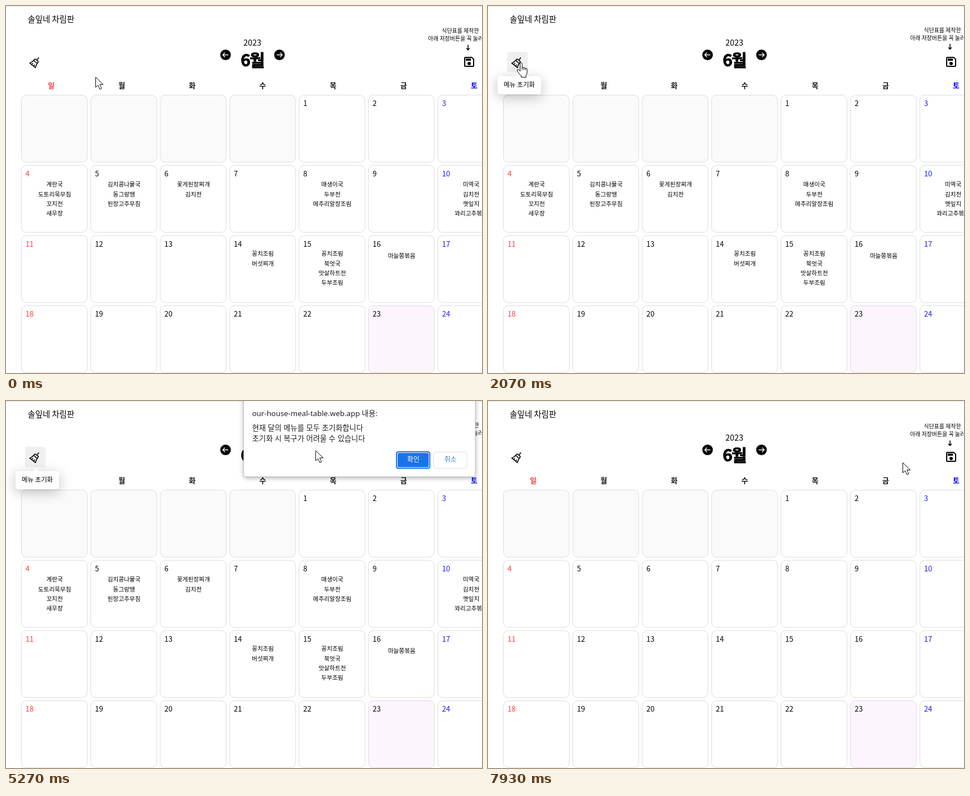
Recreate the animation shown at these times as an HTML page with a canvas. Size 852 by 657 pixels, loop 8000 ms.

```html
<!DOCTYPE html>
<html lang="ko">
<head>
<meta charset="utf-8">
<title>식단 달력</title>
<style>
html, body { margin: 0; width: 100%; height: 100%; overflow: hidden; background: #fff; }
canvas { display: block; }
</style>
</head>
<body>
<canvas id="stage" width="852" height="657"></canvas>
<script>
const ctx = document.getElementById('stage').getContext('2d');
const LOOP = 8000;
const HOVER_AT = 1070, DIALOG_AT = 2100, CLOSE_AT = 6670;
const KR = '"Noto Sans CJK KR", "Noto Sans KR", "Noto Sans CJK", "Noto Sans CJK JP", sans-serif';
const UI = '"Noto Sans", ' + KR;
const RED = '#ff3b3b', BLUE = '#1a1aff';

const menus = {
  4: [319.5, '계란국', '도토리묵무침', '꼬지전', '새우장'],
  5: [319.5, '김치콩나물국', '동그랑땡', '된장고추무침'],
  6: [319.5, '꽃게된장찌개', '김치전'],
  8: [319.5, '매생이국', '두부전', '메추리알장조림'],
  10: [319.5, '미역국', '김치전', '깻잎지', '꽈리고추볶음'],
  14: [443.5, '꽁치조림', '버섯찌개'],
  15: [443.5, '꽁치조림', '북엇국', '맛살하트전', '두부조림'],
  16: [447, '마늘쫑볶음']
};

// time, x, y of the pointer tip
const pointerPath = [
  [0, 160, 127], [450, 160, 127], [870, 105, 123], [1060, 70, 108], [1200, 61, 103],
  [1400, 60, 101], [2950, 60, 101], [3250, 125, 127], [3530, 253, 130], [3800, 420, 110],
  [4000, 515, 95], [4400, 542, 92], [4730, 550, 89], [5600, 556, 88], [5850, 610, 98],
  [6200, 730, 109], [6330, 742, 110]
];

const saveIcon = new Path2D('M17 3H5c-1.1 0-2 .9-2 2v14c0 1.1.9 2 2 2h14c1.1 0 2-.9 2-2V7l-4-4z' +
  'm2 16H5V5h11.2L19 7.8V19zM12 12a3 3 0 1 0 0 6a3 3 0 1 0 0-6zM6 6h9v4H6z');
const arrowPointer = new Path2D('M0 0V18L4.2 14.3L7.5 21.5L10.5 20L7.4 13H13.5Z');
const handPointer = new Path2D('M6 2Q6 0 7.8 0Q9.5 0 9.5 2V9Q11 7.5 12.5 9Q14.5 8.2 15.5 10Q18 9.5 18.5 12' +
  'V17Q18.5 21 16.5 22.5V26H8V23.5Q4 20 .8 14.5Q0 12 2.5 12Q4.5 13 6 15ZM9.5 9V13M12.5 9V13M15.5 10V13.5');
const broom = new Path2D('M0-10.5V-4.5M-4.2-.5V-2.5Q-4.2-4.5-2.2-4.5H2.2Q4.2-4.5 4.2-2.5V-.5Z' +
  'M-4.2-.5Q-4.5 4-6.6 7.5H6.6Q4.5 4 4.2-.5M-2.2 7.5V4M2.2 7.5V4');

function text(str, x, midY, size, { color = '#000', align = 'left', weight = 500, family = KR } = {}) {
  ctx.font = `${weight} ${size}px ${family}`;
  ctx.fillStyle = color;
  ctx.textAlign = align;
  ctx.fillText(str, x, midY + size * 0.37);
}

function box(x, y, w, h, r, fill, stroke) {
  ctx.beginPath();
  ctx.roundRect(x, y, w, h, r);
  if (fill) { ctx.fillStyle = fill; ctx.fill(); }
  if (stroke) { ctx.strokeStyle = stroke; ctx.lineWidth = 1; ctx.stroke(); }
}

function shadowed(blur, dy, alpha, draw) {
  ctx.save();
  ctx.shadowColor = `rgba(0,0,0,${alpha})`;
  ctx.shadowBlur = blur;
  ctx.shadowOffsetY = dy;
  draw();
  ctx.restore();
}

function lines(color, width, ...paths) {
  ctx.strokeStyle = color;
  ctx.lineWidth = width;
  ctx.beginPath();
  for (const points of paths) points.forEach(([x, y], i) => i ? ctx.lineTo(x, y) : ctx.moveTo(x, y));
  ctx.stroke();
}

function roundArrow(x, dir) {
  const y = 87.5;
  ctx.fillStyle = '#000';
  ctx.beginPath();
  ctx.arc(x, y, 9.5, 0, Math.PI * 2);
  ctx.fill();
  lines('#fff', 1.3, [[x - 5 * dir, y], [x + 4.5 * dir, y]],
    [[x + 1 * dir, y - 4], [x + 5 * dir, y], [x + 1 * dir, y + 4]]);
}

function header() {
  ctx.fillStyle = '#e6e6e6';
  ctx.fillRect(0, 0, 852, 1);
  text('솔잎네 차림판', 39, 23.5, 14.5);
  text('2023', 441, 66, 14.4, { align: 'center' });
  roundArrow(393, -1);
  roundArrow(489.5, 1);

  ctx.letterSpacing = '-2px';
  text('6월', 420, 97, 30, { weight: 900 });
  ctx.strokeStyle = '#000';
  ctx.lineWidth = 0.8;
  ctx.strokeText('6월', 420, 97 + 30 * 0.37);
  ctx.letterSpacing = '0px';

  [...'일월화수목금토'].forEach((day, i) => text(day, 81 + 126.15 * i, 142, 13,
    { align: 'center', weight: 700, color: i === 0 ? RED : i === 6 ? '#0000ff' : '#111' }));
}

function calendar(filled) {
  for (let row = 0; row < 4; row++) for (let col = 0; col < 7; col++) {
    const day = row * 7 + col - 3;
    const x = 27.5 + 124.25 * col, y = 159.5 + 125.7 * row;
    box(x, y, 118, 120, 9, day < 1 ? '#fafafa' : day === 23 ? '#fdf5fd' : '#fff', '#dcdcdc');
    if (day < 1) continue;
    text(day, x + 7.5, y + 15, 13, { color: col === 0 ? RED : col === 6 ? BLUE : '#000' });
    if (!filled || !menus[day]) continue;
    const [top, ...dishes] = menus[day];
    dishes.forEach((dish, i) => text(dish, x + 59.5, top + 17.2 * i, 10.7, { align: 'center' }));
  }
}

// Slow at the bottom, sharp turn at the top, once per second.
function hint(t) {
  const phase = ((t / 1000 - 0.655) % 1 + 1) % 1;
  const u = Math.min(phase, 1 - phase) * 2;
  const y = 47.4 - 6.2 * u * u;
  text('식단표를 제작한', 780, y, 10);
  text('아래 저장버튼을 꼭 눌러주세요', 755.5, y + 14, 10);
  lines('#000', 1.5, [[827, y + 25], [827, y + 34]], [[824, y + 31], [827, y + 34.3], [830, y + 31]]);
}

function icons(hover) {
  if (hover > 0) box(34, 82, 37, 36.5, 4, `rgba(0,0,0,${0.06 * hover})`);
  ctx.save();
  ctx.translate(52.3, 100.5);
  ctx.rotate(0.68);
  ctx.strokeStyle = '#000';
  ctx.lineWidth = 1.6;
  ctx.lineJoin = 'round';
  ctx.stroke(broom);
  ctx.restore();

  ctx.save();
  ctx.translate(817, 88);
  ctx.fillStyle = '#000';
  ctx.fill(saveIcon, 'evenodd');
  ctx.restore();
}

function tooltip() {
  shadowed(22, 5, 0.25, () => box(17, 125.5, 78, 32.5, 5, '#fff'));
  ctx.fillStyle = '#fff';
  ctx.beginPath();
  ctx.moveTo(48, 126);
  ctx.lineTo(53, 121);
  ctx.lineTo(58, 126);
  ctx.fill();
  text('메뉴 초기화', 56, 141, 11.6, { align: 'center' });
}

function dialog(hovered) {
  shadowed(8, 2, 0.35, () => box(425.5, -12, 414.5, 147.5, 4, '#fff'));
  box(425.5, -12, 414.5, 147.5, 4, null, '#c4c4c4');
  const plain = { color: '#202124', weight: 400, family: UI };
  text('our-house-meal-table.web.app 내용:', 440.5, 22.5, 13.35, plain);
  text('현재 달의 메뉴를 모두 초기화합니다', 440.5, 48, 13.4, plain);
  text('초기화 시 복구가 어려울 수 있습니다', 440.5, 67, 13.4, plain);

  box(698, 90, 61.5, 31.5, 4.5, '#1a73e8');
  box(700, 92, 57.5, 27.5, 3, '#fff');
  box(701, 93, 55.5, 25.5, 2.5, hovered ? '#2e7ee0' : '#1a73e8');
  text('확인', 729, 105, 12, { ...plain, color: '#fff', align: 'center' });
  box(765.5, 91.5, 59.5, 29, 3.5, '#fff', '#dfe1e5');
  text('취소', 795.5, 105, 12, { ...plain, color: '#3b7de0', align: 'center' });
}

function pointerAt(t) {
  const next = pointerPath.findIndex(p => p[0] > t);
  if (next < 0) return pointerPath[pointerPath.length - 1].slice(1);
  const a = pointerPath[next - 1], b = pointerPath[next];
  const k = (t - a[0]) / (b[0] - a[0]);
  return [a[1] + (b[1] - a[1]) * k, a[2] + (b[2] - a[2]) * k];
}

function pointer(x, y) {
  const overBroom = x < 71 && y < 118;
  ctx.save();
  ctx.translate(overBroom ? x - 8.5 : x + 0.5, y + 0.5);
  ctx.fillStyle = '#fff';
  ctx.strokeStyle = '#000';
  ctx.lineWidth = 1;
  const shape = overBroom ? handPointer : arrowPointer;
  ctx.fill(shape);
  ctx.stroke(shape);
  ctx.restore();
}

function draw(t) {
  const open = t < CLOSE_AT;
  const [x, y] = pointerAt(t);
  ctx.fillStyle = '#fff';
  ctx.fillRect(0, 0, 852, 657);
  header();
  calendar(open);
  hint(t);
  icons(open ? Math.max(0, Math.min(1, (t - HOVER_AT) / 250)) : 0);
  if (open && t >= HOVER_AT) tooltip();
  if (open && t >= DIALOG_AT) dialog(x > 698 && y > 90);
  pointer(x, y);
}

const start = performance.now();
function tick() {
  draw((performance.now() - start) % LOOP);
  requestAnimationFrame(tick);
}
tick();
</script>
</body>
</html>
```
